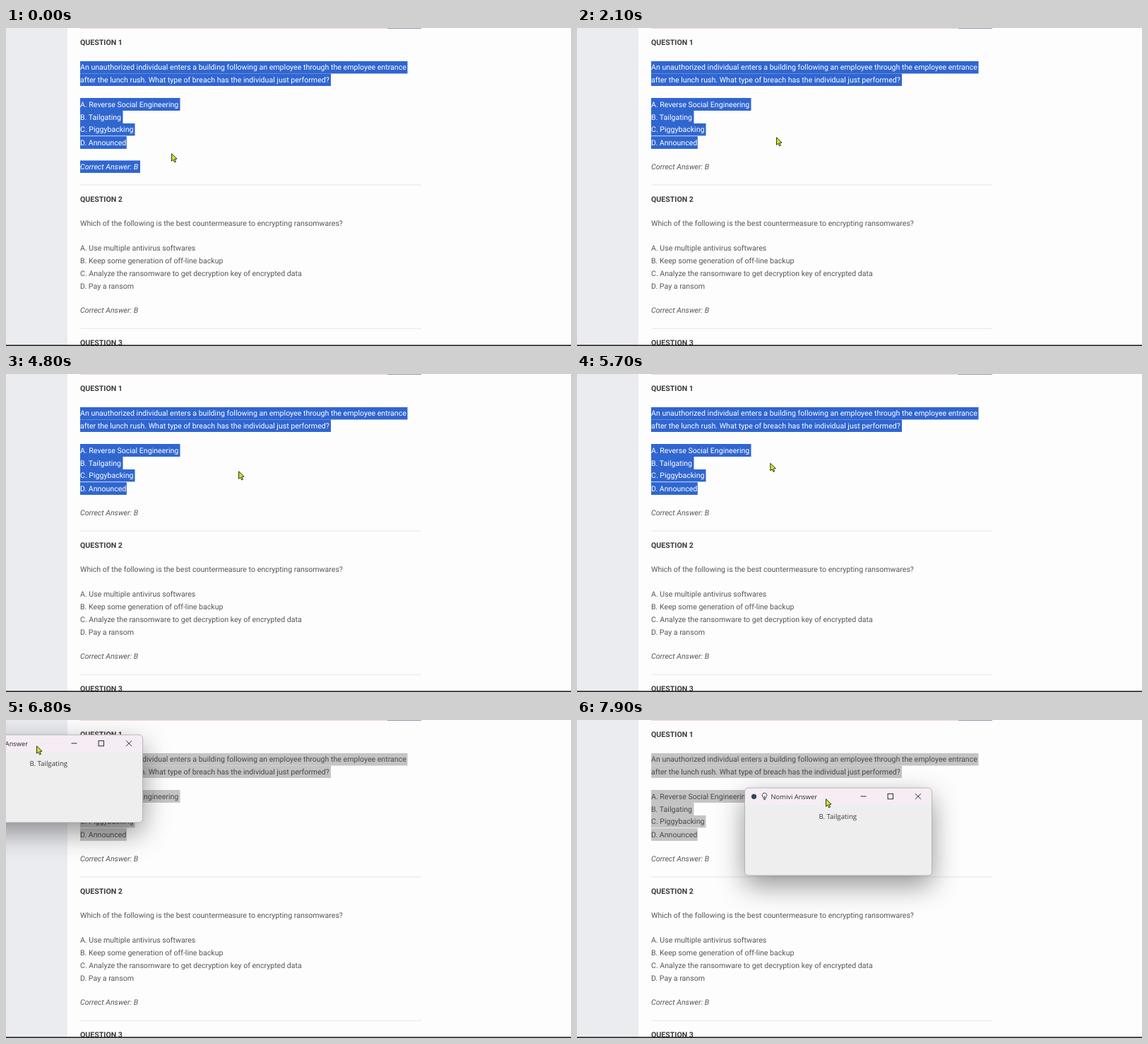
Recreate the animation shown at these times as an HTML page with a canvas. Size 800 by 450 pixels, loop 8000 ms.

```html
<!DOCTYPE html>
<html lang="en">
<head>
<meta charset="utf-8">
<title>Quiz helper</title>
<style>
html, body { margin: 0; width: 100%; height: 100%; overflow: hidden; background: #fdfdfd; }
canvas { display: block; width: 800px; height: 450px; }
</style>
</head>
<body>
<canvas id="stage"></canvas>
<script>
const canvas = document.getElementById('stage');
const ctx = canvas.getContext('2d');
const dpr = window.devicePixelRatio || 1;
canvas.width = 800 * dpr;
canvas.height = 450 * dpr;

const LOOP = 8000, STEP = 100;
const POPUP_AT = 5800, GRAB_AT = 6600;
const BODY = '10.6px Roboto, sans-serif';
const BOLD = 'bold ' + BODY;
const ITALIC = 'italic ' + BODY;
const UI = 'px "Open Sans", "Noto Sans", sans-serif';
const WIN = { w: 265, h: 124, bar: 24.5, gripX: 114.5, gripY: 15, x0: -123.5, y0: 19.5 };

// text, baseline, font
const page = [
  ['QUESTION 1', 24, BOLD],
  ['QUESTION 2', 245.5, BOLD],
  ['Which of the following is the best countermeasure to encrypting ransomwares?', 280, BODY],
  ['A. Use multiple antivirus softwares', 314.5, BODY],
  ['B. Keep some generation of off-line backup', 333, BODY],
  ['C. Analyze the ransomware to get decryption key of encrypted data', 351, BODY],
  ['D. Pay a ransom', 369, BODY],
  ['Correct Answer: B', 403, ITALIC],
  ['QUESTION 3', 448.5, BOLD]
];

// text, baseline, font, highlight top, highlight bottom, highlight right
const selectable = [
  ['An unauthorized individual enters a building following an employee through the employee entrance', 59.4, BODY, 47, 64.5, 568.5],
  ['after the lunch rush. What type of breach has the individual just performed?', 77, BODY, 64.5, 82, 460],
  ['A. Reverse Social Engineering', 111.5, BODY, 99, 117, 246.5],
  ['B. Tailgating', 129.5, BODY, 117, 135, 165.5],
  ['C. Piggybacking', 147.4, BODY, 135, 152.4, 182.5],
  ['D. Announced', 165.6, BODY, 153.2, 171, 170.8],
  ['Correct Answer: B', 200.2, ITALIC, 187.5, 205, 190]
];

// time, x, y of the pointer tip
const path = [
  [0, 234, 177], [200, 234, 177], [1400, 282, 154], [2700, 282, 154],
  [3700, 329, 137], [5500, 329, 137], [6200, 48, 79], [6300, 48, 79],
  [GRAB_AT, -9, 34.5], [6800, 43, 36], [7300, 390, 119], [7900, 352, 111]
];

function pointerAt(t) {
  for (let i = 1; i < path.length; i++) {
    const [t0, x0, y0] = path[i - 1], [t1, x1, y1] = path[i];
    if (t <= t1) {
      const k = (t - t0) / (t1 - t0), e = k * k * (3 - 2 * k);
      return { x: x0 + (x1 - x0) * e, y: y0 + (y1 - y0) * e };
    }
  }
  return { x: 352, y: 111 };
}

function rect(x, y, w, h, fill) {
  ctx.fillStyle = fill;
  ctx.fillRect(x, y, w, h);
}

function text(str, x, y, font, fill) {
  ctx.font = font;
  ctx.fillStyle = fill;
  ctx.fillText(str, x, y);
}

function lines(points, color, width) {
  ctx.beginPath();
  for (const [x0, y0, x1, y1] of points) {
    ctx.moveTo(x0, y0);
    ctx.lineTo(x1, y1);
  }
  ctx.strokeStyle = color;
  ctx.lineWidth = width;
  ctx.stroke();
}

function drawPage(selectAnswer, active) {
  rect(0, 0, 800, 450, '#fdfdfd');
  rect(0, 0, 87, 450, '#ebecf0');
  rect(105, 0, 435, 1, '#f0d3d9');
  rect(540, 0, 48, 1, '#8f98ab');
  rect(105, 221.5, 483, 1, '#e6e6e8');
  rect(105, 424.8, 483, 1, '#e6e6e8');
  for (const [str, y, font] of page) {
    text(str, 105, y, font, font === BOLD ? '#3c3c40' : '#56565a');
  }
  selectable.forEach(([str, y, font, top, bottom, right], i) => {
    const on = i < 6 || selectAnswer;
    if (on) rect(105, top, right - 105, bottom - top, active ? '#3066d0' : '#c4c4c4');
    text(str, 105, y, font, on ? (active ? '#ffffff' : '#4a4a4c') : '#56565a');
  });
  rect(0, 448.4, 800, 1.6, '#242427');
}

function drawBulb(x, y) {
  ctx.beginPath();
  ctx.arc(x, y - 1.5, 3.3, Math.PI * 0.72, Math.PI * 2.28);
  ctx.lineTo(x + 1.5, y + 3);
  ctx.lineTo(x - 1.5, y + 3);
  ctx.closePath();
  ctx.strokeStyle = '#3a3a3e';
  ctx.lineWidth = 0.9;
  ctx.stroke();
  lines([[x - 1.4, y + 4.6, x + 1.4, y + 4.6], [x, y - 0.5, x, y + 3]], '#3a3a3e', 0.9);
}

function drawWindow(x, y, focused) {
  const { w, h, bar } = WIN;
  const ink = focused ? '#2c2c30' : '#8c8c90';
  ctx.save();
  ctx.translate(x, y);
  ctx.beginPath();
  ctx.roundRect(0, 0, w, h, 5);
  ctx.save();
  ctx.shadowColor = focused ? 'rgba(0,0,0,.42)' : 'rgba(0,0,0,.3)';
  ctx.shadowBlur = (focused ? 38 : 20) * dpr;
  ctx.shadowOffsetY = (focused ? 14 : 6) * dpr;
  ctx.fillStyle = '#eeeeef';
  ctx.fill();
  ctx.restore();

  ctx.save();
  ctx.clip();
  rect(0, 0, w, h, focused ? '#eeeeef' : '#ebedef');
  rect(0, 0, w, bar, focused ? '#f6edf4' : '#f1f1f3');
  ctx.restore();
  ctx.strokeStyle = '#a9a9ae';
  ctx.lineWidth = 0.8;
  ctx.stroke();

  ctx.beginPath();
  ctx.arc(13, 12.3, 3.6, 0, Math.PI * 2);
  ctx.fillStyle = '#34465c';
  ctx.fill();
  drawBulb(28, 12);
  text('Nomivi Answer', 37, 15.9, '9.35' + UI, ink);
  text('B. Tailgating', 105, 44, '9.7' + UI, '#3c3c40');

  lines([
    [164, 12, 172, 12],
    [241.5, 8.2, 249.5, 16.2], [249.5, 8.2, 241.5, 16.2]
  ], ink, 1);
  ctx.strokeRect(202.6, 8.4, 7.4, 7.4);
  ctx.restore();
}

function drawPointer({ x, y }) {
  ctx.save();
  ctx.translate(x + 0.5, y + 0.8);
  ctx.beginPath();
  [[0, 0], [0, 10.6], [2.4, 8.5], [4.2, 12.2], [6, 11.4], [4.4, 7.8], [7.6, 7.4]]
    .forEach(([px, py]) => ctx.lineTo(px, py));
  ctx.closePath();
  ctx.fillStyle = '#c9e62e';
  ctx.strokeStyle = '#34371f';
  ctx.lineWidth = 1;
  ctx.lineJoin = 'round';
  ctx.fill();
  ctx.stroke();
  ctx.restore();
}

function render(t) {
  const p = pointerAt(t);
  const grabbed = t >= GRAB_AT;
  ctx.setTransform(dpr, 0, 0, dpr, 0, 0);
  ctx.textRendering = 'geometricPrecision';
  drawPage(p.y > 171, !grabbed);
  if (grabbed) drawWindow(p.x - WIN.gripX, p.y - WIN.gripY, true);
  else if (t >= POPUP_AT) drawWindow(WIN.x0, WIN.y0, false);
  drawPointer(p);
}

const start = performance.now();
function tick() {
  const t = (performance.now() - start) % LOOP;
  render(Math.floor(t / STEP) * STEP);
  requestAnimationFrame(tick);
}
tick();
</script>
</body>
</html>
```
